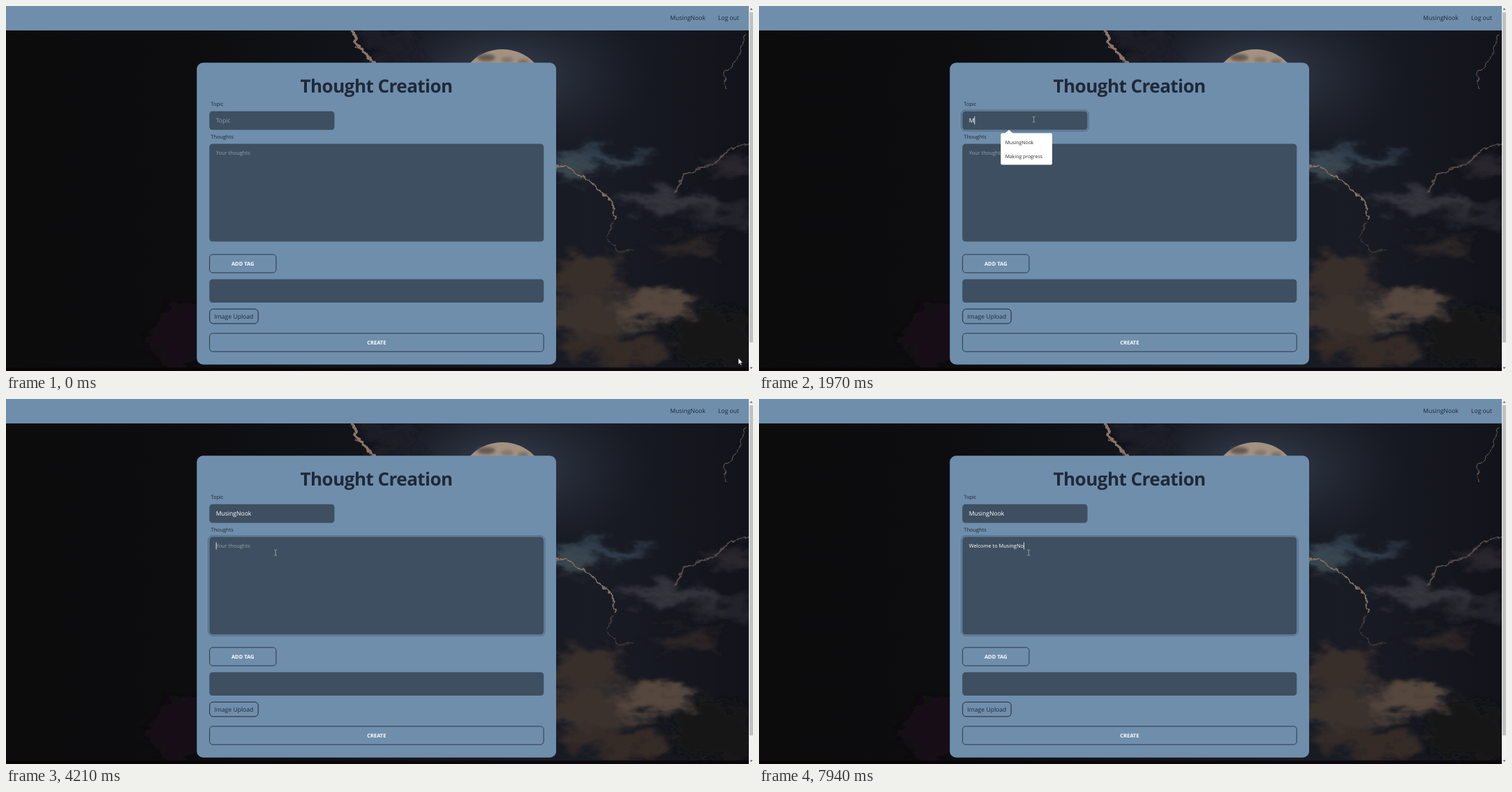
An HTML page for the animation above (8000 ms loop, 1070 by 523 pixels).

```html
<!DOCTYPE html>
<html lang="en">
<head>
<meta charset="utf-8">
<title>Thought Creation</title>
<style>
  html, body { margin: 0; width: 100%; height: 100%; overflow: hidden; background: #0c0c0d; }
  svg { display: block; width: 100vw; height: 100vh; }
  text {
    font: 8.6px "Open Sans", "Noto Sans", sans-serif;
    fill: #1f2937; white-space: pre; text-rendering: geometricPrecision;
  }
  .panel { fill: #6f8eac; }
  .field { fill: #3e4f61; }
  .ring { fill: none; stroke: #1f2937; stroke-opacity: .4; }
  .button { fill: none; stroke: #2b394a; }
  text.small { font-size: 7.45px; }
  text.title { font-size: 26px; font-weight: 700; letter-spacing: -.02em; }
  text.action { font-size: 7.5px; font-weight: 700; fill: #fff; }
  text.hint { fill: #95a0aa; }
  text.typed { fill: #fff; }
  #menu text { font-size: 6.9px; fill: #26282c; }
  .middle { text-anchor: middle; }
  .edge { fill: none; stroke-linejoin: round; stroke-linecap: round; }
</style>
</head>
<body>
<svg viewBox="0 0 1070 523" preserveAspectRatio="none">
  <defs>
    <linearGradient id="night">
      <stop offset="0" stop-color="#0c0c0d"/>
      <stop offset=".25" stop-color="#0d0d0f"/>
      <stop offset=".52" stop-color="#13151c"/>
      <stop offset=".78" stop-color="#191c25"/>
      <stop offset="1" stop-color="#12131a"/>
    </linearGradient>
    <radialGradient id="glow">
      <stop offset="0" stop-color="#465063" stop-opacity=".8"/>
      <stop offset="1" stop-color="#232936" stop-opacity="0"/>
    </radialGradient>
    <filter id="cloud" x="-30%" y="-30%" width="160%" height="160%">
      <feTurbulence type="fractalNoise" baseFrequency=".022 .04" numOctaves="4" seed="8" result="noise"/>
      <feGaussianBlur in="SourceGraphic" stdDeviation="7"/>
      <feDisplacementMap in2="noise" scale="58" xChannelSelector="R" yChannelSelector="G"/>
    </filter>
    <filter id="rough" x="-20%" y="-20%" width="140%" height="140%">
      <feTurbulence type="fractalNoise" baseFrequency=".12" numOctaves="3" seed="3" result="noise"/>
      <feDisplacementMap in="SourceGraphic" in2="noise" scale="8" xChannelSelector="R" yChannelSelector="G"/>
      <feGaussianBlur stdDeviation=".5"/>
    </filter>
    <filter id="soft"><feGaussianBlur stdDeviation="2"/></filter>
  </defs>

  <!-- night sky -->
  <rect width="1070" height="523" fill="url(#night)"/>
  <ellipse cx="711" cy="100" rx="215" ry="120" fill="url(#glow)"/>
  <circle cx="711" cy="126" r="64" fill="#a39282"/>
  <g fill="#65594f" filter="url(#soft)">
    <ellipse cx="688" cy="74" rx="13" ry="5"/>
    <ellipse cx="718" cy="77" rx="9" ry="4" opacity=".5"/>
    <ellipse cx="741" cy="80" rx="8" ry="4" opacity=".6"/>
  </g>
  <g filter="url(#cloud)">
    <path d="M500 35 570 35 600 82 528 82Z" fill="#1d1e26"/>
    <ellipse cx="855" cy="219" rx="78" ry="9" fill="#344552"/>
    <ellipse cx="810" cy="232" rx="30" ry="12" fill="#3b4650"/>
    <ellipse cx="945" cy="280" rx="72" ry="13" fill="#34363d"/>
    <ellipse cx="1035" cy="225" rx="35" ry="14" fill="#29272d"/>
    <ellipse cx="1015" cy="300" rx="50" ry="12" fill="#25272e"/>
    <ellipse cx="975" cy="345" rx="50" ry="12" fill="#2d2827"/>
    <ellipse cx="835" cy="385" rx="55" ry="32" fill="#382f2c"/>
    <ellipse cx="925" cy="430" rx="65" ry="20" fill="#54463e"/>
    <ellipse cx="830" cy="445" rx="60" ry="28" fill="#3b312d"/>
    <ellipse cx="875" cy="490" rx="75" ry="20" fill="#352c28"/>
    <ellipse cx="1020" cy="480" rx="65" ry="42" fill="#141213"/>
    <ellipse cx="250" cy="470" rx="45" ry="45" fill="#141112"/>
  </g>
  <g class="edge" filter="url(#rough)">
    <path d="M495 36 502 45 498 53 510 62 515 70 528 83" stroke="#8c7568" stroke-width="4"/>
    <path d="M788 231 803 228 815 239 835 250 850 264 868 280 872 304" stroke="#857266" stroke-width="1.8"/>
    <path d="M871 304 861 331 876 352 899 349" stroke="#4a413e" stroke-width="1.2"/>
    <path d="M1059 40 1053 66 1040 85 1029 97 1031 120" stroke="#5c4e4b" stroke-width="1.3"/>
    <path d="M1064 196 1036 206 1015 225 971 241 958 267" stroke="#564a48" stroke-width="2.2"/>
  </g>
  <rect y="518" width="1064" height="5" fill="#080305" opacity=".75"/>

  <!-- navigation and scrollbar -->
  <rect class="panel" width="1064" height="35"/>
  <text x="1002" y="20" text-anchor="end">MusingNook</text>
  <text x="1020" y="20">Log out</text>
  <rect x="1064" width="6" height="523" fill="#f1f1f1"/>
  <rect x="1065" y="9" width="5" height="473" fill="#c1c1c1"/>
  <path d="M1065.5 5.5h4l-2-2.5zM1065.5 517.5h4l-2 2.5z" fill="#606060"/>

  <!-- form -->
  <rect class="panel" x="273.3" y="81.3" width="514.7" height="432.4" rx="9"/>
  <text class="title middle" x="530.6" y="123.5">Thought Creation</text>
  <text class="small" x="293.3" y="143.3">Topic</text>
  <rect class="field" x="291.3" y="150.8" width="179.2" height="26.8" rx="4.5"/>
  <rect class="ring" id="topicRing" x="289.6" y="149.2" width="182.6" height="30" rx="6"/>
  <text class="small" x="293.3" y="190.3">Thoughts</text>
  <rect class="field" x="291.3" y="197.6" width="479" height="140" rx="4.5"/>
  <rect class="ring" id="bodyRing" x="289.6" y="196" width="482.4" height="143.2" rx="6"/>
  <rect class="button" x="291.6" y="356" width="95.3" height="26.2" rx="4.5"/>
  <text class="action middle" x="339.2" y="371.7">ADD TAG</text>
  <rect class="field" x="291.3" y="391.4" width="479" height="33.6" rx="4.5"/>
  <rect class="button" x="291.7" y="434.2" width="69.5" height="20.8" rx="5" style="stroke:#1f2937"/>
  <text class="middle" x="326.4" y="447.8">Image Upload</text>
  <rect class="button" x="291.6" y="469" width="478.6" height="26.2" rx="4.5"/>
  <text class="action middle" x="530.8" y="484.9">CREATE</text>

  <!-- live parts -->
  <text id="topic" x="300.7" y="167.4"></text>
  <text id="body" x="300.7" y="213.2"></text>
  <rect id="caret" width=".8" fill="#fff"/>
  <g id="menu">
    <path d="M351.5 183 358 177.6 364.5 183Z" fill="#fff"/>
    <rect id="menuBox" x="346.3" y="182.3" rx="2" fill="#fff"/>
    <g id="menuItems"></g>
  </g>
  <circle id="click" r="6.8" fill="#e6e010" opacity=".62"/>
  <g id="pointer">
    <path id="beam" d="M-1.8-4Q0-4 0-3Q0-4 1.8-4M0-3V3M-1.8 4Q0 4 0 3Q0 4 1.8 4" fill="none" stroke="#b4b0a8" stroke-width=".8"/>
    <path id="arrow" d="M0 0V9.2L2.1 7.3 3.5 10.4 4.9 9.8 3.6 6.8H6.4Z" fill="#fff" stroke="#111" stroke-width=".6"/>
  </g>
</svg>
<script>
  const LOOP = 8000;
  const ORIGIN = 300.7;
  const $ = id => document.getElementById(id);
  const show = (id, on) => $(id).style.display = on ? "" : "none";
  const within = (t, from, to) => t >= from && t < to;

  // Evenly spaced key presses; "<" deletes a character.
  const type = (keys, from, to = from) =>
    [...keys].map((key, i) => [from + (to - from) * i / Math.max(1, keys.length - 1), key]);

  const topicKeys = [
    ...type("M", 1770), ...type("u", 2170), ...type("si", 2370, 2440),
    ...type("ngN", 2640, 2780), ...type("oo", 2980, 3050), ...type("k", 3250)
  ];
  const bodyKeys = [
    ...type("W", 4610), ...type("elcoem", 4880, 5410), ...type("<", 5940),
    ...type("<me to ", 6100, 6750), ...type("M", 7010), ...type("u", 7210),
    ...type("singNo", 7410, 7940)
  ];
  const textAt = (keys, t) => keys.reduce((text, [time, key]) =>
    time > t + .01 ? text : key === "<" ? text.slice(0, -1) : text + key, "");

  const menus = [
    { from: 730, width: 114.4, items: ["Star", "Programming - Best Practices", "Games", "Hi", "Hello", "asdsfsd"] },
    { from: 1840, width: 73.7, items: ["MusingNook", "Making progress"] },
    { from: 2170, width: 60, items: ["MusingNook"] }
  ];
  let openMenu;

  function drawMenu(t) {
    const menu = menus.filter(m => t >= m.from).pop();
    show("menu", menu && t < 3460);
    const fade = t < 3250 ? 0 : 1 + Math.floor((t - 3250) / 70);
    $("menu").style.opacity = [1, .88, .55, .22][fade] ?? 0;
    if (!menu || menu === openMenu) return;
    openMenu = menu;
    $("menuBox").setAttribute("width", menu.width);
    $("menuBox").setAttribute("height", 4.8 + 20.15 * menu.items.length);
    $("menuItems").innerHTML = menu.items.map((label, i) =>
      `<text x="352.8" y="${197.6 + 20.15 * i}">${label}</text>`).join("");
  }

  function drawField(id, text, hint, size) {
    const field = $(id);
    field.textContent = text || hint;
    field.setAttribute("class", `${size} ${text ? "typed" : "hint"}`);
  }

  function drawCaret(t, text) {
    const inBody = t >= 4060;
    show("caret", t >= 670 && !within(t, 1240, 1770));
    const advance = text ? $(inBody ? "body" : "topic").getComputedTextLength() : 0;
    $("caret").setAttribute("x", ORIGIN + advance);
    $("caret").setAttribute("y", inBody ? 205.3 : 158.2);
    $("caret").setAttribute("height", inBody ? 10.2 : 11.6);
  }

  const bezier = (u, a, b, c, d) =>
    (1 - u) ** 3 * a + 3 * u * (1 - u) ** 2 * b + 3 * u * u * (1 - u) * c + u ** 3 * d;
  // Stepped progress with a soft start and stop.
  function progress(t, from, to, steps) {
    const raw = (t - from) / (to - from) * (steps - 1) + 1;
    const u = Math.min(1, Math.max(0, Math.floor(raw + 1e-6) / steps));
    return u * u * (3 - 2 * u);
  }

  function pointerAt(t) {
    if (t < 3720) {
      const u = progress(t, 70, 600, 9);
      return [bezier(u, 1049, 900, 520, 393.6), bezier(u, 504.5, 300, -50, 162.5)];
    }
    const u = progress(t, 3720, 3990, 5);
    return [393.6 - 7.4 * u, 162.5 + 57.7 * u];
  }

  const textZones = [[291, 151, 471, 178], [291, 198, 770, 338], [420, 101, 642, 128]];

  function drawPointer(t) {
    const [x, y] = pointerAt(t);
    const overText = textZones.some(([l, top, r, b]) => within(x, l, r) && within(y, top, b));
    $("pointer").setAttribute("transform", `translate(${x} ${y})`);
    show("beam", overText);
    show("arrow", !overText);
    show("click", within(t, 670, 830) || within(t, 4000, 4210));
    $("click").setAttribute("cx", x - 1.5);
    $("click").setAttribute("cy", y);
  }

  function draw(now) {
    const t = now % LOOP;
    const topic = textAt(topicKeys, t);
    const body = textAt(bodyKeys, t);
    drawField("topic", topic, "Topic", "");
    drawField("body", body, "Your thoughts", "small");
    show("topicRing", within(t, 670, 4060));
    show("bodyRing", t >= 4060);
    drawCaret(t, t >= 4060 ? body : topic);
    drawMenu(t);
    drawPointer(t);
  }

  const start = performance.now();
  function tick() {
    draw(performance.now() - start);
    requestAnimationFrame(tick);
  }
  tick();
</script>
</body>
</html>
```
